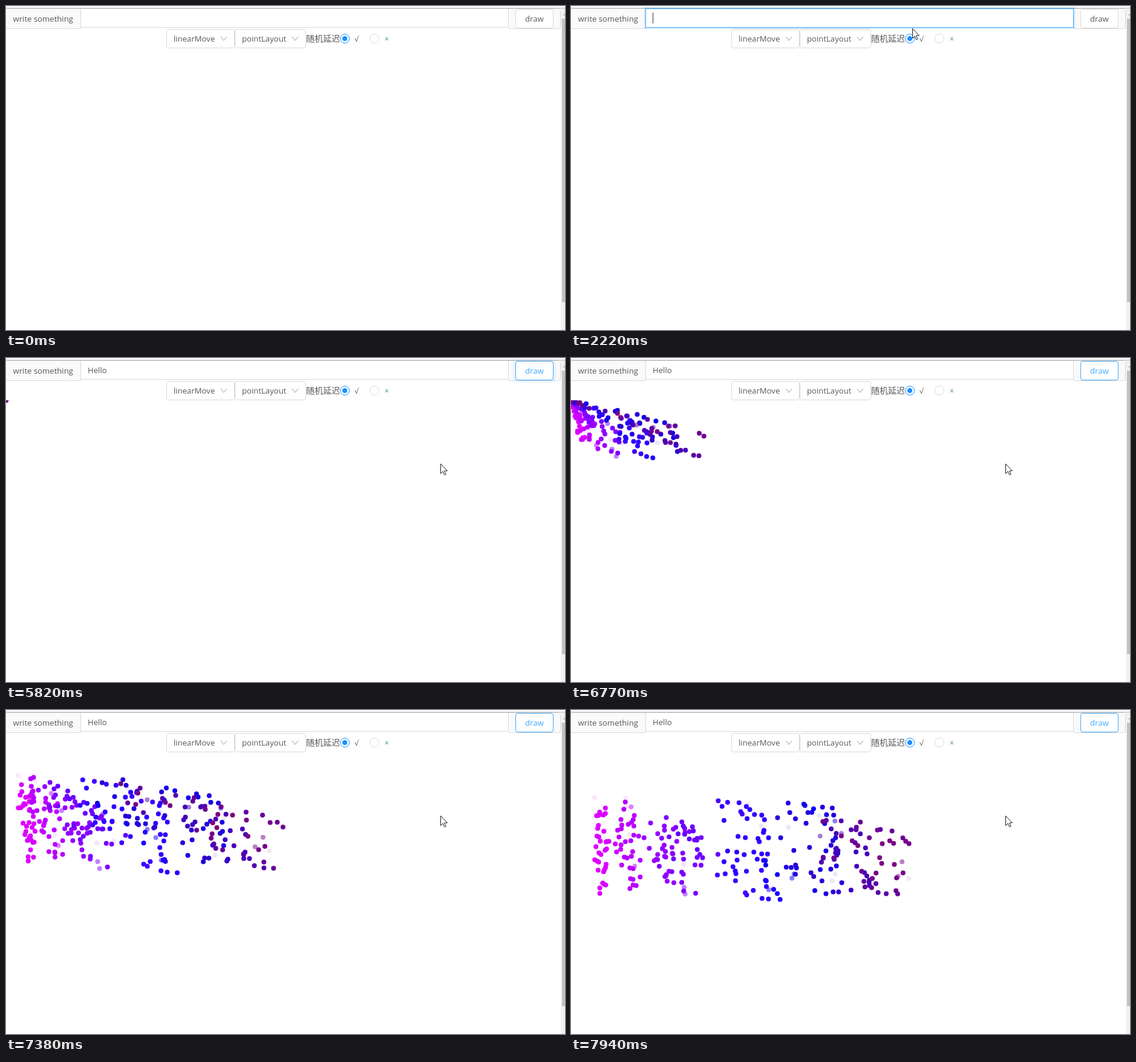
An HTML page with a canvas that plays this animation: 924 px wide and 537 px high, repeating every 8 s.

```html
<!DOCTYPE html>
<html lang="en">
<head>
<meta charset="utf-8">
<title>Text particles</title>
<style>
  html, body { margin: 0; width: 100%; height: 100%; overflow: hidden; background: #fff; }
  canvas, svg { position: absolute; left: 0; }
  canvas { top: 70px; }
  svg { top: 0; }
  text { font: 13.15px "Open Sans", "Noto Sans", sans-serif; fill: #595959; }
  .cjk { font: 14px "Noto Sans CJK SC", "Noto Sans CJK", sans-serif; }
  .mark { font-size: 12px; }
  .box { fill: #fff; stroke: #d9d9d9; }
  .addon { fill: #fafafa; stroke: #d9d9d9; }
  .line { fill: none; stroke: #bfbfbf; stroke-width: 1.2; }
  .blue { fill: none; stroke: #40a9ff; }

  /* 1% of the loop is 80 ms */
  .anim { animation: 8s step-end infinite; }
  #border { animation-name: border; }
  #halo { animation-name: halo; }
  #first { animation-name: first; }
  #second { animation-name: second; }
  #button { animation-name: button; }
  #label { animation-name: label; }
  #wave { animation-name: wave; }
  #typing { animation-name: typing; }
  #caret { animation-name: caret; }
  #cursor { animation-name: cursor; }
  #arrow { animation-name: arrow; }
  #beam { animation-name: beam; }

  @keyframes border { 0% { opacity: 0 } 9.8% { opacity: 1 } 66.8%, 100% { opacity: 0 } }
  @keyframes halo { 0% { opacity: 0 } 11.8% { opacity: 1 } 66.8%, 100% { opacity: 0 } }
  @keyframes first { 0% { opacity: 0 } 16.8% { opacity: 1 } 20.8%, 100% { opacity: 0 } }
  @keyframes second { 0% { opacity: 0 } 18.8% { opacity: 1 } 22.8%, 100% { opacity: 0 } }
  @keyframes button { 0% { stroke: #d9d9d9 } 63.8%, 100% { stroke: #40a9ff } }
  @keyframes label { 0% { fill: #595959 } 63.8%, 100% { fill: #40a9ff } }
  @keyframes wave {
    0% { opacity: 0; stroke-width: 0 }
    65.8% { opacity: .2; stroke-width: 1px; animation-timing-function: steps(7) }
    72.7% { opacity: .07; stroke-width: 8px }
    80.6% { opacity: .04; stroke-width: 9px }
    82.6%, 100% { opacity: 0; stroke-width: 9px }
  }
  @keyframes typing {
    0% { transform: translateX(135px) }
    33.6% { transform: translateX(145px) }
    38.5% { transform: translateX(152px) }
    40.35% { transform: translateX(156px) }
    42.35% { transform: translateX(159px) }
    44.35%, 100% { transform: translateX(167px) }
  }
  @keyframes caret {
    0% { opacity: 0 } 11.8% { opacity: 1 } 19.8% { opacity: 0 } 26.7% { opacity: 1 }
    51.1% { opacity: 0 } 57.8% { opacity: 1 } 64.5%, 100% { opacity: 0 }
  }
  @keyframes cursor {
    0% { opacity: 0; transform: translate(500px, 472px) }
    .87% { opacity: 1; transform: translate(500px, 472px); animation-timing-function: steps(10) }
    10.8% { opacity: 1; transform: translate(305px, 20px) }
    14.8% { opacity: 1; transform: translate(312px, 24px); animation-timing-function: steps(3) }
    17.8% { opacity: 1; transform: translate(345px, 52px); animation-timing-function: steps(5) }
    22.8% { opacity: 1; transform: translate(565px, 40px) }
    27.7% { opacity: 1; transform: translate(564px, 37px) }
    54.95% { opacity: 1; transform: translate(554px, 39px); animation-timing-function: steps(6) }
    60.9% { opacity: 1; transform: translate(760px, 44px); animation-timing-function: steps(4) }
    64.9% { opacity: 1; transform: translate(872px, 24px) }
    66.8% { opacity: 1; transform: translate(872px, 24px); animation-timing-function: steps(6) }
    72.7%, 100% { opacity: 1; transform: translate(718px, 175px) }
  }
  @keyframes arrow { 0% { opacity: 1 } 10.8% { opacity: 0 } 16.7%, 100% { opacity: 1 } }
  @keyframes beam { 0% { opacity: 0 } 10.8% { opacity: 1 } 16.7%, 100% { opacity: 0 } }
</style>
</head>
<body>
<canvas id="stage" width="917" height="467"></canvas>
<svg width="924" height="537" viewBox="0 0 924 537">
  <!-- input row -->
  <path class="addon" d="M123.5 4.5H4Q-.5 4.5-.5 9V33.5Q-.5 37.5 4 37.5H123.5Z"/>
  <path class="addon" d="M830.5 4.5H912.5Q916.5 4.5 916.5 8.5V33.5Q916.5 37.5 912.5 37.5H830.5Z"/>
  <rect x="124" y="36" width="707" height="3" fill="#fff"/>
  <rect class="box" x="123.5" y="4.5" width="707" height="31"/>
  <text x="11.5" y="26">write something</text>
  <text x="135" y="25">Hello</text>
  <g id="typing" class="anim">
    <rect y="8" width="40" height="24" fill="#fff"/>
    <rect id="caret" class="anim" y="11" width="1" height="18" fill="#333"/>
  </g>
  <rect id="wave" class="anim" x="842" y="5" width="63" height="32" rx="4" fill="none" stroke="#1890ff"/>
  <rect id="button" class="box anim" x="842.5" y="5.5" width="62" height="31" rx="3.5"/>
  <text id="label" class="anim" x="858" y="26">draw</text>
  <path d="M0 3.5H924" stroke="#b2b2b2"/>
  <rect id="halo" class="anim" x="122" y="3" width="710" height="34" fill="none" stroke="#1890ff" stroke-opacity=".2" stroke-width="2"/>
  <rect id="border" class="blue anim" x="123.5" y="4.5" width="707" height="31"/>

  <!-- options row -->
  <rect class="box" x="265.5" y="38.5" width="112" height="31" rx="3.5"/>
  <rect class="box" x="378.5" y="38.5" width="117" height="31" rx="3.5"/>
  <rect id="first" class="blue anim" x="265.5" y="38.5" width="112" height="31" rx="3.5"/>
  <rect id="second" class="blue anim" x="378.5" y="38.5" width="117" height="31" rx="3.5"/>
  <text x="277" y="59">linearMove</text>
  <text x="390" y="59">pointLayout</text>
  <path class="line" d="M355 51l5 6 5-6M473 51l5 6 5-6"/>
  <text class="cjk" x="496" y="59">随机延迟</text>
  <circle cx="560" cy="54" r="7.5" fill="#fff" stroke="#1890ff"/>
  <circle cx="560" cy="54" r="4" fill="#1890ff"/>
  <circle class="box" cx="609" cy="54" r="7.5"/>
  <text class="mark" x="576" y="59">√</text>
  <text class="mark" x="626" y="59" style="fill:#5288a4">×</text>

  <!-- scrollbar -->
  <rect x="917" y="4" width="7" height="533" fill="#f1f1f1"/>
  <rect x="919" y="21" width="5" height="470" fill="#c1c1c1"/>
  <path d="M921 15.5l3-3v3z" fill="#a3a3a3"/>

  <g id="cursor" class="anim">
    <path id="arrow" class="anim" d="M.5.5V16.5L4.2 13 6.8 18.8 9.2 17.7 6.6 12H11.6Z" fill="#fff" stroke="#1c1c2b"/>
    <path id="beam" class="anim" d="M-3-7.5H3M.5-7V8M-3 8.5H3" fill="none" stroke="#222"/>
  </g>
</svg>
<script>
const LOOP = 8000, STEP = 78.7;
const DRAW = 5600, START = 6425, TAU = 820, MAX_DELAY = 700;
const GAP = 11, RADIUS = 4;
const BLUE_X = 470, PURPLE_X = 690;
const ctx = document.getElementById("stage").getContext("2d");

let seed = 7;
const random = () => (seed = seed * 16807 % 2147483647) / 2147483647;

// Monospaced "Hello" as pen strokes
const word = new Path2D(
  "M63 105V291M131 105V291M63 194H131" +
  "M190 217H286.8A49 58 0 1 0 262 273" +
  "M338 115H385V280M338 280H424" +
  "M482 115H528V280M484 280H567" +
  "M584 222A50 58 0 1 1 684 222A50 58 0 1 1 584 222");

// magenta, then blue, then purple from left to right
function colour(x) {
  if (x < BLUE_X) return `rgb(${255 * (1 - x / BLUE_X)},0,255)`;
  const k = Math.min(1, (x - BLUE_X) / (PURPLE_X - BLUE_X));
  return `rgb(${128 * k},0,${255 - 127 * k})`;
}

function opacity() {
  const r = random();
  return r < .06 ? .09 : r < .1 ? .5 : 1;
}

const dots = [];
ctx.lineWidth = 23;
for (let x = 48; x < 710; x += GAP) {
  for (let y = 103; y < 300; y += GAP) {
    if (ctx.isPointInStroke(word, x, y)) {
      dots.push({ x, y, fill: colour(x), alpha: opacity(), delay: MAX_DELAY * random() ** 1.3 });
    }
  }
}

function paint() {
  const now = performance.now() % LOOP;
  const t = 70 + STEP * Math.floor((now - 60) / STEP);
  ctx.clearRect(0, 0, 917, 467);
  if (t >= DRAW) {
    for (const { x, y, fill, alpha, delay } of dots) {
      const p = 1 - Math.exp(-Math.max(0, t - START - delay) / TAU);
      ctx.globalAlpha = alpha;
      ctx.fillStyle = fill;
      ctx.beginPath();
      ctx.arc(x * p, y * p, RADIUS, 0, 2 * Math.PI);
      ctx.fill();
    }
  }
  requestAnimationFrame(paint);
}
paint();
</script>
</body>
</html>
```
